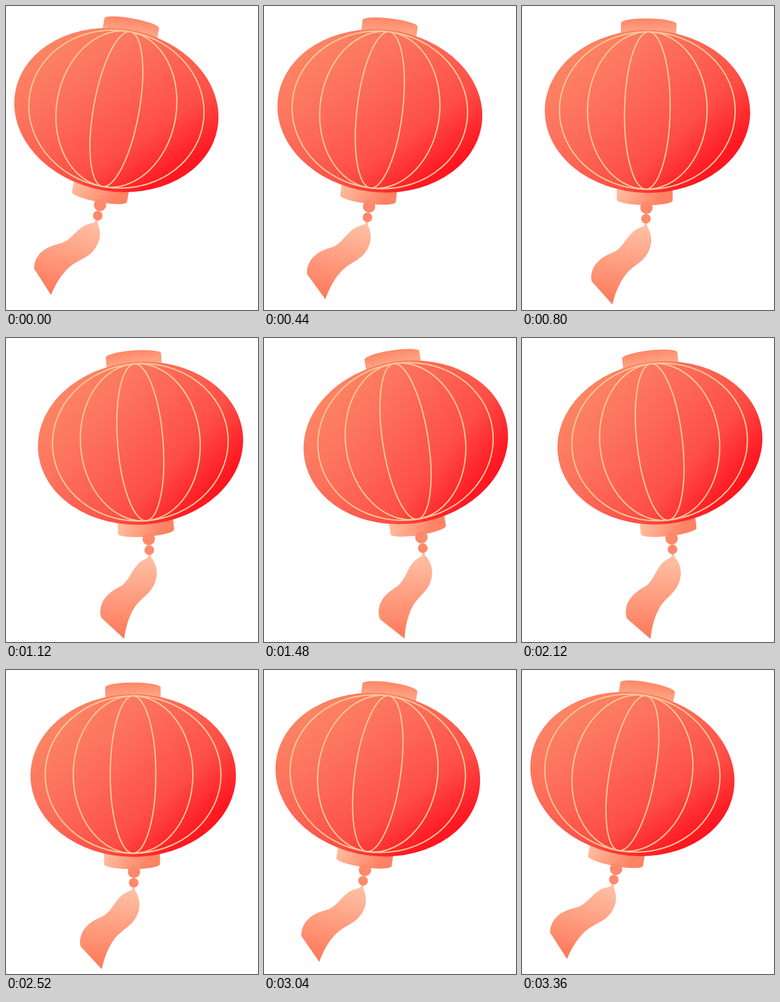
These frames come from a looping animation (476 by 573 pixels, 3.4 s). An HTML page:

```html
<!DOCTYPE html>
<html lang="en">
<head>
<meta charset="utf-8">
<title>Swinging lantern</title>
<style>
  html, body { margin: 0; width: 100%; height: 100%; overflow: hidden; background: #fff; }
  svg { display: block; width: 100%; height: 100%; }
</style>
</head>
<body>
<svg viewBox="0 0 476 573">
  <defs>
    <linearGradient id="body" gradientUnits="userSpaceOnUse" x1="122" y1="74" x2="359" y2="325">
      <stop offset="0" stop-color="#fc8465"/>
      <stop offset=".3" stop-color="#fd705b"/>
      <stop offset=".7" stop-color="#fe4e46"/>
      <stop offset=".95" stop-color="#ff1a24"/>
      <stop offset="1" stop-color="#ff1620"/>
    </linearGradient>
    <linearGradient id="cap" gradientUnits="userSpaceOnUse" x1="238" y1="24" x2="240" y2="60">
      <stop offset="0" stop-color="#fe8767"/>
      <stop offset="1" stop-color="#feb092"/>
    </linearGradient>
    <linearGradient id="collar" gradientUnits="userSpaceOnUse" x1="190" y1="348" x2="264" y2="376">
      <stop offset="0" stop-color="#ffba9c"/>
      <stop offset="1" stop-color="#fe8263"/>
    </linearGradient>
    <linearGradient id="tassel" gradientUnits="userSpaceOnUse" x1="206" y1="415" x2="196" y2="560">
      <stop offset="0" stop-color="#ffbfa3"/>
      <stop offset="1" stop-color="#fe7a5b"/>
    </linearGradient>
  </defs>
  <g id="lantern">
    <path fill="url(#cap)" d="M187.3 60V33A52.4 9.5 0 0 1 292.1 33V60Z"/>
    <path fill="url(#collar)" d="M185.3 335V366.3A52.8 9.5 0 0 0 290.8 366.3V335Z"/>
    <ellipse cx="240.3" cy="198.9" rx="194" ry="153.3" fill="url(#body)"/>
    <g id="ribs" fill="none" stroke="#fcc794" stroke-width="2.5"></g>
    <path fill="url(#tassel)" d="M239 408
      C239 417 235 415 226 420 C207 430 203 451 185 463
      C173 469 159 474 149 487 C141 497 138 511 141 521
      L181 564 C185 543 196 514 212 499
      C227 485 240 480 248 461 C255 444 252 432 247 421
      C245 417 243 416 243 408Z"/>
    <g fill="#fe8a6b">
      <circle cx="241.8" cy="380.3" r="11.6"/>
      <circle cx="241.2" cy="401" r="9.1"/>
    </g>
  </g>
</svg>
<script>
  const LOOP = 3400, STEP = 40, HALF = 1690;
  const SWING = 10, REST = 0.27, PIVOT = "239.7 20.5";
  const lantern = document.getElementById("lantern");
  const ribs = document.getElementById("ribs");

  for (const rx of [166, 113, 43]) {
    const rib = document.createElementNS("http://www.w3.org/2000/svg", "ellipse");
    const shape = { cx: 240, cy: 197.1, rx, ry: 148.3 };
    for (const key in shape) rib.setAttribute(key, shape[key]);
    ribs.append(rib);
  }

  const ease = u => u * u * (3 - 2 * u);

  function draw(now) {
    const t = Math.floor((now % LOOP) / STEP) * STEP;
    const u = 1 - Math.abs(1 - t / HALF);
    const angle = SWING * (1 - 2 * ease(u));
    lantern.setAttribute("transform", `rotate(${angle + REST} ${PIVOT})`);
  }

  const start = performance.now();
  function tick() {
    draw(performance.now() - start);
    requestAnimationFrame(tick);
  }
  tick();
</script>
</body>
</html>
```
